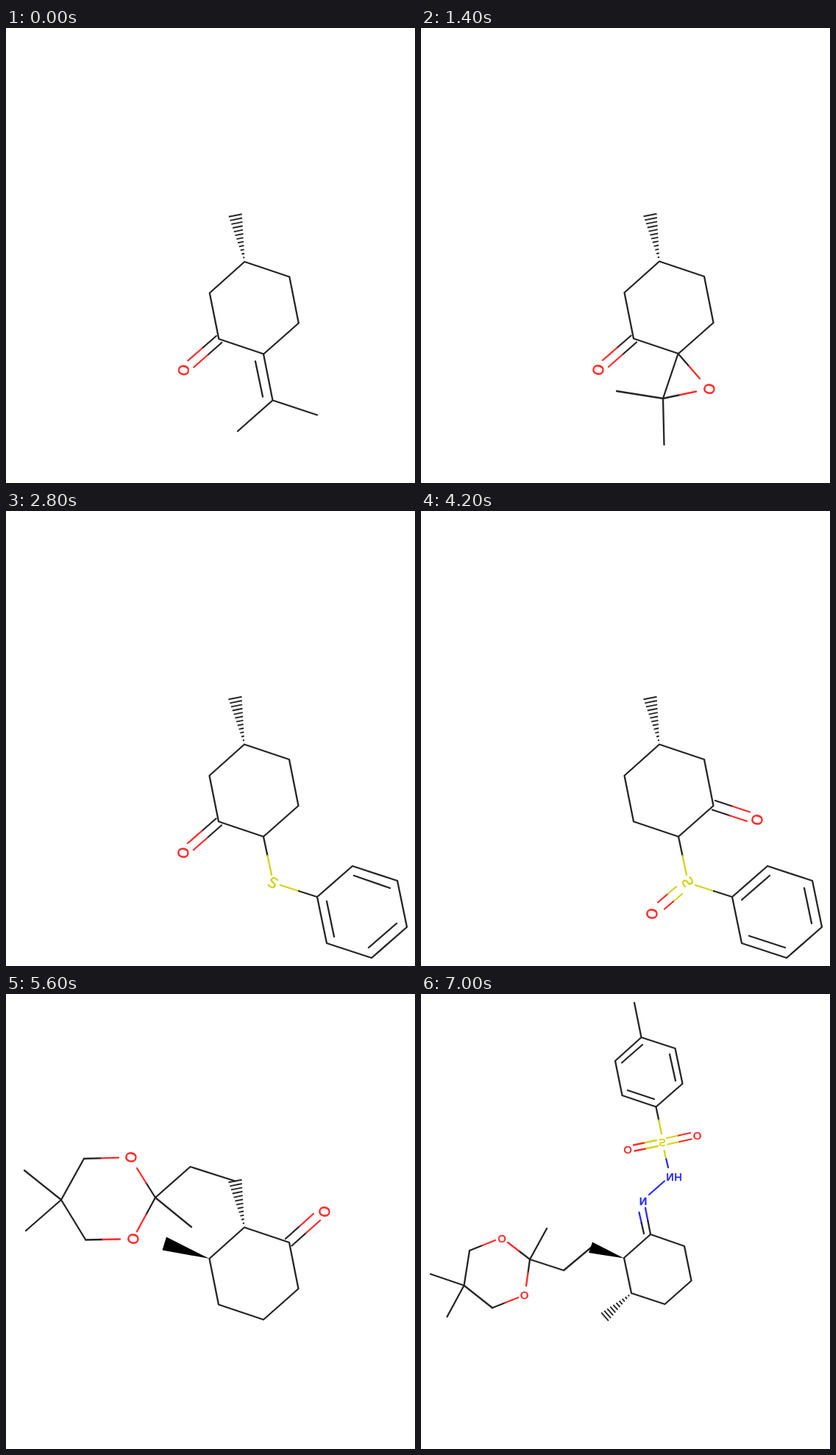
An HTML page that plays this animation: 556x619 px, repeating every 8000 ms.

```html
<!DOCTYPE html>
<html lang="en">
<head>
<meta charset="utf-8">
<title>Skeletal structures</title>
<style>
html, body { margin: 0; width: 100%; height: 100%; overflow: hidden; background: #fff; }
svg { display: block; width: 556px; height: 619px; filter: blur(.4px); }
path { fill: none; stroke-width: 2.3; stroke-linecap: round; stroke-linejoin: round; }
text { font-family: "DejaVu Sans", sans-serif; text-anchor: middle; stroke-width: .6; }
.scene { visibility: hidden; animation: show 8s step-end infinite; }
.scene:last-child { animation-name: showLast; }
@keyframes show { 0% { visibility: visible; } 17.5%, 100% { visibility: hidden; } }
@keyframes showLast { 0% { visibility: visible; } 12.5%, 100% { visibility: hidden; } }
</style>
</head>
<body>
<svg id="stage" viewBox="0 0 556 619"></svg>
<script>
const C = '#262626', O = '#ff2a2a', S = '#d2d21c', N = '#2a2aff';

const line = (d, color = C) => `<path d="${d}" stroke="${color}"/>`;

// A bond whose halves take the colours of its two atoms
const bond = (x1, y1, x2, y2, from, to) => {
  const mx = (x1 + x2) / 2, my = (y1 + y2) / 2;
  return line(`M${x1} ${y1}L${mx} ${my}`, from) + line(`M${mx} ${my}L${x2} ${y2}`, to);
};

const atom = (text, x, y, color, turn = 100, size = 19.5, flip = -1) =>
  `<text transform="translate(${x} ${y}) rotate(${turn}) scale(1 ${flip})"
    y="${size * 0.365}" font-size="${size}" fill="${color}" stroke="${color}">${text}</text>`;

const small = (text, x, y, color) => atom(text, x, y, color, 0, 14.8);

const hash = (x1, y1, x2, y2, half, count) => {
  const dx = x2 - x1, dy = y2 - y1, len = Math.hypot(dx, dy);
  let d = '';
  for (let i = 1; i <= count; i++) {
    const t = i / count, w = half * t + 0.4;
    const x = x1 + dx * t, y = y1 + dy * t, ox = -dy / len * w, oy = dx / len * w;
    d += `M${x - ox} ${y - oy}L${x + ox} ${y + oy}`;
  }
  return `<path d="${d}" stroke="${C}" style="stroke-width:1.9;stroke-linecap:butt"/>`;
};

const wedge = points => `<polygon points="${points}" fill="#000"/>`;

const ring = line('M324 317.500L385 338 397.500 401 350 443 289 422.500 276.500 360Z');
const methyl = hash(324, 317, 311.500, 254.500, 8.8, 12);
const core = ring + methyl;

const ketone = bond(285.500, 418.500, 247, 452, C, O) + bond(293, 427.500, 255, 461, C, O)
  + atom('O', 241, 465, O);

const phenyl = line('M423 525L471 483 532 503 545 566 497 608 436 588Z')
  + bond(350, 443, 361, 495, C, S) + bond(373, 509, 423, 525, S, C);

const scenes = [
  `<g transform="translate(.3 .5)">${core}${ketone}</g>`
    + line('M350 443.500L362.500 506.500 423 526.500M362.500 506.500L315 548.500M339 453.500L349 501.500'),

  core + ketone
    + line('M349.500 443L329 504 266 494M329 504L330.500 567')
    + bond(349.500, 443, 379, 477, C, O) + bond(329, 504, 374, 494.500, C, O)
    + atom('O', 392, 491, O),

  core + ketone + phenyl
    + line('M473 496L522 513M531 561L493 594M446 579L436 531')
    + atom('S', 363, 505.500, S, 28, 19.5, 1),

  core + phenyl
    + line('M436 529L474 496M521 513L531 561M495 594L446 578')
    + bond(400, 394, 447, 409.500, C, O) + bond(396, 406.500, 443, 422, C, O)
    + bond(347, 511, 322, 532.500, S, O) + bond(355, 521, 331, 541.500, S, O)
    + atom('S', 362.500, 505, S, 60) + atom('O', 457, 420, O) + atom('O', 314, 548, O),

  core
    + line('M311.500 254.500L250.500 235 203 277 252 317')
    + line('M106 224L75 280 108 334M25 240L75 280 27 322')
    + bond(203, 277, 178, 237, C, O) + bond(106, 224, 153, 222.700, C, O)
    + bond(108, 334.500, 155, 333.500, C, O) + bond(203, 277, 178, 323, C, O)
    + bond(380, 333, 418, 299, C, O) + bond(388.500, 342.500, 427, 308, C, O)
    + wedge('276.500,360 212.500,348.500 218,330.500')
    + atom('O', 170, 222, O) + atom('O', 173, 333, O) + atom('O', 433, 296, O),

  line('M290 12L299.500 59 345.500 74 355.500 122 319.500 153.500 273.500 138 264 91 299.500 59')
    + line('M273 93.500L301 69M338 82L346 118M317 143L281 131')
    + bond(319.500, 153.500, 327, 190, C, S)
    + bond(289, 205.500, 320, 199, O, S) + bond(290.500, 213.500, 322, 207, O, S)
    + bond(334, 196, 366, 189, S, O) + bond(335.500, 204.500, 367.500, 197.500, S, O)
    + bond(330.500, 213, 336, 236, S, N) + line('M331 254.500L310 273', N)
    + bond(305, 291, 312, 327, N, C) + bond(296.500, 297, 303, 326, N, C)
    + line('M312 327L358 343 367.500 390 331.500 422 286 407 276 359Z')
    + line('M231 345L194 376 148 361 171 319')
    + line('M66 349L58.500 396.500 97 427M13 381L58.500 396.500 35.500 439')
    + bond(148, 361, 118, 338, C, O) + bond(66, 349, 101, 335, C, O)
    + bond(97, 427, 132, 413, C, O) + bond(148, 361, 143, 397, C, O)
    + wedge('276,359.500 228,352 233,337.500')
    + hash(286, 407, 250, 439, 7, 10)
    + small('O', 110, 333, O) + small('O', 140.500, 410.500, O)
    + small('O', 281, 212, O) + small('O', 375.500, 193, O)
    + small('S', 328, 202, S) + small('NH', 344, 249.500, N) + small('N', 302, 282, N)
];

document.getElementById('stage').innerHTML = scenes
  .map((art, i) => `<g class="scene" style="animation-delay:${i * 1.4}s">${art}</g>`)
  .join('');
</script>
</body>
</html>
```
